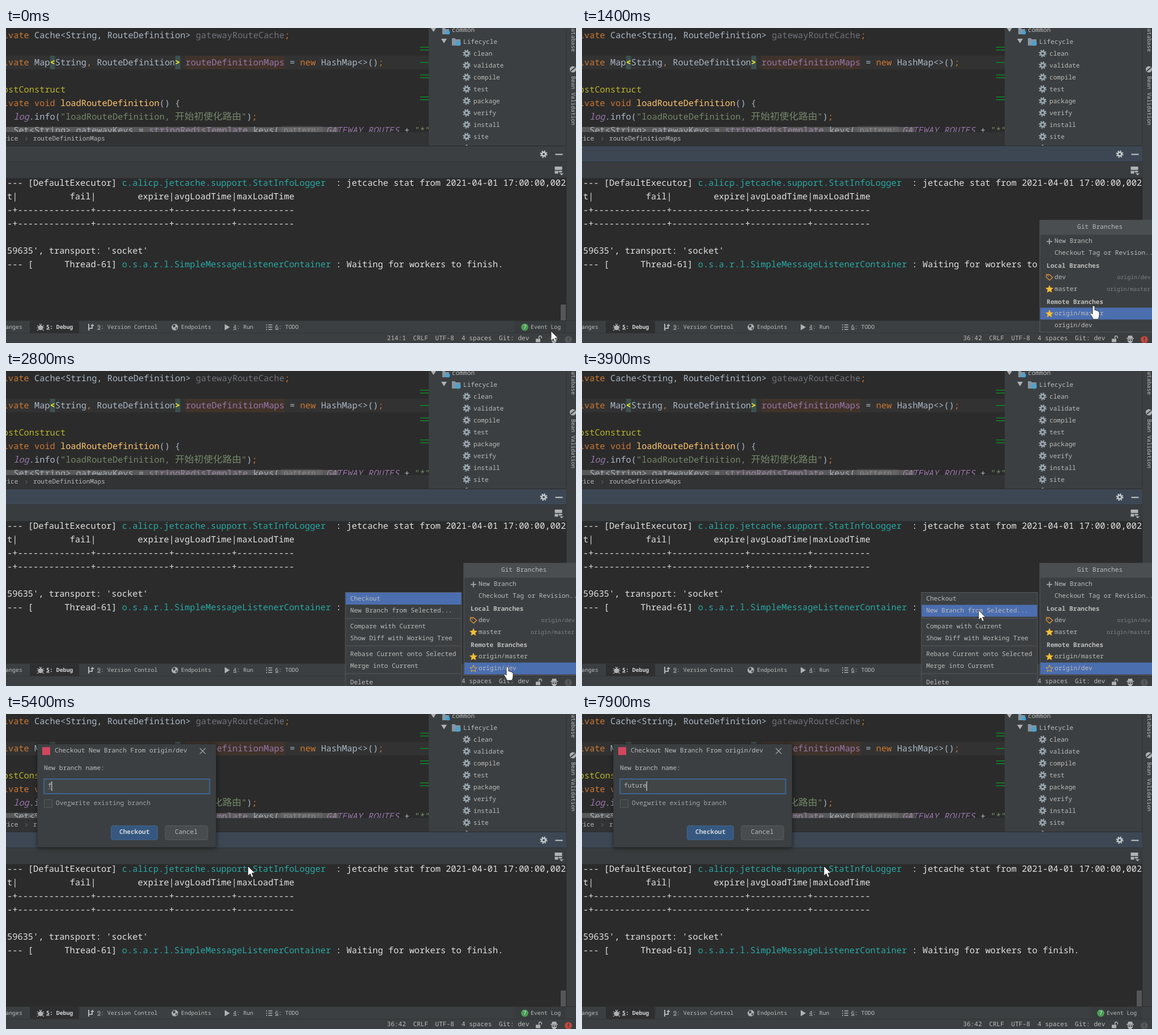
An HTML page for the animation above (8 s loop, 1006 by 557 pixels).

```html
<!DOCTYPE html>
<html lang="en">
<head>
<meta charset="utf-8">
<title>Checkout new branch</title>
<style>
html, body { margin: 0; width: 100%; height: 100%; overflow: hidden; background: #2b2b2b; }
svg { display: block; width: 1006px; height: 557px; }
text { font: 11.13px "Noto Sans Mono", "DejaVu Sans Mono", monospace; fill: #bbb; white-space: pre; text-rendering: geometricPrecision; }
.code { font-size: 15.33px; }
.console .code { font-size: 15.36px; }
.tab { font-size: 9.85px; }
.bold { font-weight: 700; }
.cjk { font: 300 16.75px "Noto Sans CJK SC", "Noto Sans CJK", sans-serif; }
.u { text-decoration: underline; }
</style>
</head>
<body>
<svg id="stage" viewBox="0 0 1006 557" xmlns="http://www.w3.org/2000/svg"></svg>
<script>
const PANEL = '#3c3f41', DARK = '#2b2b2b', BLUE = '#4b6eaf', GREY = '#afb1b3';
const ORANGE = '#cc7832', PLAIN = '#a9b7c6', STRING = '#75886a', PURPLE = '#9876aa', TEAL = '#29a9a4', OUTPUT = '#e2e2e2';

const esc = s => s.replace(/&/g, '&amp;').replace(/</g, '&lt;');
const rect = (x, y, w, h, fill, more = '') => `<rect x="${x}" y="${y}" width="${w}" height="${h}" fill="${fill}" ${more}/>`;
const line = (d, color = GREY, width = 1.5, more = '') => `<path d="${d}" fill="none" stroke="${color}" stroke-width="${width}" ${more}/>`;
const fill = (d, color = GREY) => `<path d="${d}" fill="${color}"/>`;
const dot = (x, y, r, color, more = '') => `<circle cx="${x}" cy="${y}" r="${r}" fill="${color}" ${more}/>`;
const group = (id, body, more = '') => `<g id="${id}" ${more}>${body}</g>`;
// y is the middle of the capital letters
const label = (x, y, s, cls = '', color = '#bbb', more = '') =>
  `<text x="${x}" y="${y + 4}" class="${cls}" style="fill:${color}" ${more}>${esc(s)}</text>`;
// spans: [text, colour, style, class]
const code = (x, y, ...spans) => `<text x="${x}" y="${y + 5}" class="code">` + spans.map(([s, c = PLAIN, style = '', cls = '']) =>
  `<tspan class="${cls}" style="fill:${c};${style}">${esc(s)}</tspan>`).join('') + '</text>';
const hotTab = (x, key, name, cls = '', color = '#bbb') =>
  `<text x="${x}" y="531.5" class="tab ${cls}" style="fill:${color}"><tspan class="u">${key}</tspan>: ${name}</text>`;

const gear = (x, y, r = 5, color = '#9aa7b0') =>
  dot(x, y, r * .62, 'none', `stroke="${color}" stroke-width="${r * .5}"`) +
  dot(x, y, r, 'none', `stroke="${color}" stroke-width="${r * .45}" stroke-dasharray="${Math.PI * r / 8}"`);

function star(x, y, solid = true) {
  const pts = Array.from({ length: 10 }, (_, i) => {
    const a = Math.PI * (i / 5 - .5), r = i % 2 ? 2.9 : 6.6;
    return `${(x + r * Math.cos(a)).toFixed(1)},${(y + r * Math.sin(a)).toFixed(1)}`;
  });
  return `<polygon points="${pts.join(' ')}" fill="${solid ? '#f4c03c' : 'none'}" stroke="#eab02f"/>`;
}

function editor() {
  const bracket = 'font-weight:700';
  const marks = [33, 38, 60, 82, 87, 121, 126].map(y => rect(731, y, 15, 1.8, '#157a2c')).join('');
  return `<g clip-path="url(#editorClip)">` +
    rect(0, 49, 746, 24, '#323232') + rect(317, 49, 175, 24, '#40332b') +
    rect(77.6, 49, 9, 24, '#3b514d') + rect(298.7, 49, 9, 24, '#3b514d') +
    code(-23.6, 13, ['private ', ORANGE], ['Cache<String, RouteDefinition> '], ['gatewayRouteCache', '#72737a'], [';', ORANGE]) +
    code(-23.6, 61, ['private ', ORANGE], ['Map'], ['<', '#ffef28', bracket], ['String', PLAIN], [', ', ORANGE], ['RouteDefinition'],
      ['>', '#ffef28', bracket], [' '], ['routeDefinitionMaps', PURPLE], [' = '], ['new ', ORANGE], ['HashMap<>()'], [';', ORANGE]) +
    code(-23.6, 109, ['@PostConstruct', '#bbb529']) +
    code(-23.6, 133, ['private void ', ORANGE], ['loadRouteDefinition', '#ffc66d'], ['() {']) +
    code(13.2, 157, ['log', PURPLE, 'font-style:italic'], ['.info('], ['"loadRouteDefinition, ', STRING],
      ['开始初使化路由', STRING, '', 'cjk'], ['"', STRING], [')'], [';', ORANGE]) +
    code(13.2, 181, ['Set<String> gatewayKeys = '], ['stringRedisTemplate', PURPLE], ['.keys(']) +
    rect(485, 173, 74, 15, '#3b3b3b', 'rx="3"') + `<text x="490" y="185" style="font-size:13.5px;fill:#787878">pattern:</text>` +
    code(565, 181, ['GATEWAY_ROUTES', PURPLE, 'font-style:italic'], [' + '], ['"*"', STRING]) +
    rect(0, 175, 587, 9, '#a6a6a6', 'opacity=".36"') + marks + '</g>' +
    rect(0, 184, 746, 25, '#313335') + label(-25.3, 195, 'service') +
    line('M34.5 193l3 3l-3 3', '#777', 1) + label(48, 195, 'routeDefinitionMaps');
}

function sidePanel() {
  const goals = ['clean', 'validate', 'compile', 'test', 'package', 'verify', 'install', 'site'];
  return rect(746, 0, 260, 209, PANEL) + rect(989, 0, 17, 540, PANEL) + rect(988.5, 0, 1, 518, '#313335') +
    fill('M750 0h9l-4.5 7z') + fill('M768 19h10l-5 8z') +
    fill('M770 0h5l1 2h6v9h-12z', '#8396a3') + dot(780, 8, 3.5, '#40a5d9') + label(787, 3, 'common') +
    fill('M787 18h5l2 2h8v11h-15z', '#8396a3') + gear(798, 27, 4, '#40a5d9') + label(807, 24, 'Lifecycle') +
    goals.map((name, i) => gear(813, 45 + i * 21, 5.5) + label(825, 45 + i * 21, name)).join('') +
    rect(811.5, 206.5, 3, 2, '#9aa7b0') +
    `<text transform="translate(998 -5) rotate(90)" class="tab">Database</text>` +
    dot(1000.5, 73, 5.5, GREY) + line('M997 76l7-6', PANEL, 2) +
    `<text transform="translate(998 85) rotate(90)" class="tab" style="font-size:9.7px">Bean Validation</text>`;
}

function consolePane() {
  const dash = n => '-'.repeat(n);
  const rule = `-+${dash(14)}+${dash(14)}+${dash(11)}+${dash(11)}`;
  const rows = [
    ['--- [DefaultExecutor] ', 'c.alicp.jetcache.support.StatInfoLogger', '  : jetcache stat from 2021-04-01 17:00:00,002'],
    [`t|${' '.repeat(10)}fail|${' '.repeat(8)}expire|avgLoadTime|maxLoadTime`],
    [rule], [rule], [],
    ["59635', transport: 'socket'"],
    ['--- [      Thread-61] ', 'o.s.a.r.l.SimpleMessageListenerContainer', ' : Waiting for workers to finish.'],
  ];
  const output = rows.map((spans, i) =>
    code(2, 273.5 + 24.1 * i, ...spans.map((s, j) => [s, j === 1 ? TEAL : OUTPUT]))).join('');
  return rect(0, 208, 989, 1, '#292b2d') + rect(0, 209, 989, 28, '#3b3f42', 'id="header"') +
    rect(0, 236, 989, 1, '#313335') + rect(0, 237, 989, 29, '#393c3e') + rect(0, 265.5, 989, 252, DARK) +
    gear(949, 223, 5.3, '#c5c8ca') + line('M969.5 223.5h13', '#c5c8ca', 2) +
    rect(968.5, 245, 13, 6, GREY) + rect(968.5, 252.5, 6, 5, GREY) + rect(975.5, 252.5, 6, 3, GREY) + fill('M977 257h7l-3.5 3.5z') +
    `<g class="console">${output}</g>` + rect(979, 489, 9, 28, '#555657');
}

function bottomBars() {
  const bug = dot(61, 530, 4.3, GREY) + line('M55 526l3 2M67 526l-3 2M54.5 530h13M55 535l3-2M67 535l-3-2M59 523l2 3l2-3', GREY, 1.2);
  const branch = line('M146 523v12M146 531h6v-5', GREY, 2) + fill('M149 527l3.5-4l3.5 4z');
  const globe = dot(298, 529, 5.8, GREY) + fill('M294 526l4-2l1 4l-3 2zM299 530l4-1l-3 5z', PANEL);
  const list = line('M463 525h7M463 529h7M463 533h7', GREY, 1.7) + line('M459 525h2M459 529h2M459 533h2', GREY, 1.7);
  return rect(0, 517, 1006, 40, PANEL) + rect(0, 517, 1006, 1, '#323232') + rect(0, 539, 1006, 1, '#323232') +
    label(-48, 527.5, 'Local Changes', 'tab') +
    rect(42, 518, 87, 21, '#2d2f30') + bug + hotTab(71, 5, 'Debug', 'bold', '#d5d5d5') +
    branch + hotTab(161, 9, 'Version Control') +
    globe + label(309, 527.5, 'Endpoints', 'tab') +
    fill('M386 523.5l9 5.5l-9 5.5z') + hotTab(401, 4, 'Run') +
    list + hotTab(475, 6, 'TODO') +
    rect(897, 518, 92, 21, '#383b3d') + dot(915.5, 529, 6.5, '#499c54') + label(912.8, 528, '7', 'tab', '#e4e4e4') + label(926, 527.5, 'Event Log', 'tab') +
    `<text id="position" x="672.5" y="552"></text>` +
    label(718.5, 548, 'CRLF') + label(757.5, 548, 'UTF-8') + label(804, 548, '4 spaces') + label(870, 548, 'Git: dev') +
    rect(935, 549.5, 8, 6, GREY) + line('M940.5 549.5v-2.5a2.4 2.4 0 0 1 4.800 0v2', GREY, 1.5) +
    fill('M963 548l1-4h7l1 4zM961 548h13v1.5h-13zM963 550h9v4l-2.5 3h-4l-2.5-3z') + rect(964.5, 551, 2.5, 2, PANEL) + rect(968.5, 551, 2.5, 2, PANEL) +
    group('badge', dot(992.5, 551, 6.3, 'currentColor') + rect(991.6, 547, 1.8, 5, PANEL) + rect(991.6, 553.3, 1.8, 1.8, PANEL));
}

function branchPopup() {
  return rect(808, 340, 200, 198, PANEL, 'stroke="#5a5d5f"') + rect(808.5, 340.5, 198, 25, '#4a4e50') +
    rect(809, 494.5, 197, 21, BLUE, 'id="branchPick"') +
    label(874, 351, 'Git Branches') + line('M820 377.5h10M825 372.5v10', GREY, 1.7) +
    label(834, 376, 'New Branch') + label(834, 397, 'Checkout Tag or Revision...') +
    label(820, 419.5, 'Local Branches', 'bold') +
    line('M819.5 436h5.5l5.5 5l-5 5l-6-5z', '#d9933d', 1.3) + dot(822.5, 438.5, 1, '#d9933d') + label(834, 440, 'dev') +
    label(944.5, 440, 'origin/dev', 'tab', '#7d8082') +
    star(825, 462) + label(834, 461, 'master') + label(926, 461, 'origin/master', 'tab', '#7d8082') +
    label(820, 483.5, 'Remote Branches', 'bold') +
    star(825, 505.5) + label(834, 504, 'origin/master') +
    group('hollowStar', star(825, 526.5, false)) + label(834, 525, 'origin/dev');
}

function subMenu() {
  const items = { 402: 'Checkout', 423: 'New Branch from Selected...', 451: 'Compare with Current', 472: 'Show Diff with Working Tree',
    500: 'Rebase Current onto Selected', 521: 'Merge into Current', 550: 'Delete' };
  return rect(599, 391.5, 205, 170, PANEL, 'stroke="#585b5d"') + rect(599.5, 392, 204, 21, BLUE, 'id="menuPick"') +
    [437.5, 486, 535].map(y => line(`M600 ${y}h203`, '#545658', 1)).join('') +
    Object.entries(items).map(([y, s]) => label(607.5, +y, s)).join('');
}

function dialog() {
  return rect(56, 54, 315, 183, '#000', 'filter="url(#blur)" opacity=".55"') + rect(55.5, 53.5, 315, 182, PANEL, 'stroke="#333638"') +
    rect(64, 58.5, 14, 14, '#d0475f') + label(86, 64, 'Checkout New Branch From origin/dev') +
    line('M342 60.5l10 10M352 60.5l-10 10', '#a0a2a3', 1.2) +
    label(67, 95, 'New branch name:') +
    rect(67, 115, 292.5, 26, '#414546', 'stroke="#3d6490" stroke-width="2"') +
    `<text id="typed" x="74" y="130"></text>` +
    line('', '#bbb', 1, 'id="dotted" stroke-dasharray="1 1.5"') +
    rect(74, 119, 1.2, 17, '#d0d0d0', 'id="caret"') +
    rect(67.5, 151.5, 14, 14, '#3f4344', 'stroke="#55585a"') +
    `<text x="88" y="161" style="fill:#a2a4a5">Ove<tspan class="u">r</tspan>write existing branch</text>` +
    rect(185.5, 197.5, 82, 25, '#365880', 'rx="3" stroke="#426288"') + label(200, 208, 'Checkout', 'bold', '#d0d4d8') +
    rect(281, 197.5, 75, 25, '#484c4e', 'rx="3" stroke="#585b5c"') + label(298, 208, 'Cancel');
}

const pointers =
  `<path id="arrow" d="M0 0V17L4 13.4L6.7 19.5L9.5 18.2L6.8 12.3H12Z" fill="#fff" stroke="#222" stroke-width=".8"/>` +
  `<path id="hand" d="M-2 1.5Q0-1.5 2 1.5V8Q4 6.5 5 9Q7 7.5 8 10Q10 9 10 12V17Q10 20 8 24H-1Q-2 20-6 15Q-7 12-4 13L-2 15Z" fill="#fff" stroke="#222" stroke-width=".9"/>`;

document.getElementById('stage').innerHTML =
  `<defs><clipPath id="editorClip"><rect width="746" height="184"/></clipPath>` +
  `<filter id="blur" x="-10%" y="-10%" width="120%" height="120%"><feGaussianBlur stdDeviation="4"/></filter></defs>` +
  rect(0, 0, 1006, 557, DARK) + editor() + sidePanel() + consolePane() + bottomBars() +
  group('popup', branchPopup()) + group('menu', subMenu()) + group('dialog', dialog()) + group('pointer', pointers);

const LOOP = 8000, STEP = 100;
const $ = Object.fromEntries([...document.querySelectorAll('#stage [id]')].map(e => [e.id, e]));
const show = (el, on) => { el.style.display = on ? '' : 'none'; };

// time, x, y of the pointer tip
const path = [[0, 962, 536], [300, 918, 531], [600, 888, 541], [1000, 888, 541], [1400, 903, 491], [1700, 903, 491],
  [2300, 885, 523], [2800, 885, 523], [3400, 700, 423], [4000, 700, 423], [4200, 513, 319], [4500, 427, 269], [LOOP, 427, 269]];
const keystrokes = [5400, 5900, 6500, 6900, 7200, 7500];
const fade = [[4000, 0], [4100, .4], [4200, .82], [4300, .95], [4400, 1], [LOOP, 1]];

function sample(table, t) {
  const i = Math.max(1, table.findIndex(row => row[0] > t));
  const a = table[i - 1], b = table[i];
  const k = Math.min(1, Math.max(0, (t - a[0]) / (b[0] - a[0])));
  return a.slice(1).map((v, j) => v + (b[j + 1] - v) * k);
}

function render(t) {
  const onDev = t >= 2000;
  show($.popup, t >= 900 && t < 4000);
  show($.menu, t >= 2700 && t < 4000);
  show($.hollowStar, onDev);
  $.branchPick.setAttribute('y', onDev ? 515.5 : 494.5);
  $.menuPick.setAttribute('y', t >= 3200 ? 413.5 : 392);

  $.header.setAttribute('fill', t >= 900 ? '#3d4754' : '#3b3f42');
  $.position.textContent = t >= 900 ? '36:42' : '214:1';
  $.badge.style.color = Math.floor((t + 1100) / 1000) % 2 ? '#55585a' : '#c4473f';

  $.dialog.style.opacity = sample(fade, t)[0];
  const count = keystrokes.filter(k => k <= t).length;
  $.typed.textContent = 'future'.slice(0, count);
  show($.dotted, count > 0 && t < 7600);
  $.dotted.setAttribute('d', `M74 132.5h${6.68 * count}`);
  $.caret.setAttribute('x', 73.5 + 6.68 * count);
  show($.caret, t < 4900 || t >= 6400 || (t >= 5400 && t < 5900));

  const [x, y] = sample(path, t);
  const hand = t >= 1100 && t < 3100;
  $.pointer.setAttribute('transform', `translate(${x} ${y})`);
  show($.hand, hand);
  show($.arrow, !hand);
}

const start = performance.now();
function tick() {
  const t = (performance.now() - start) % LOOP;
  render(Math.floor(t / STEP) * STEP);
  requestAnimationFrame(tick);
}
tick();
</script>
</body>
</html>
```
